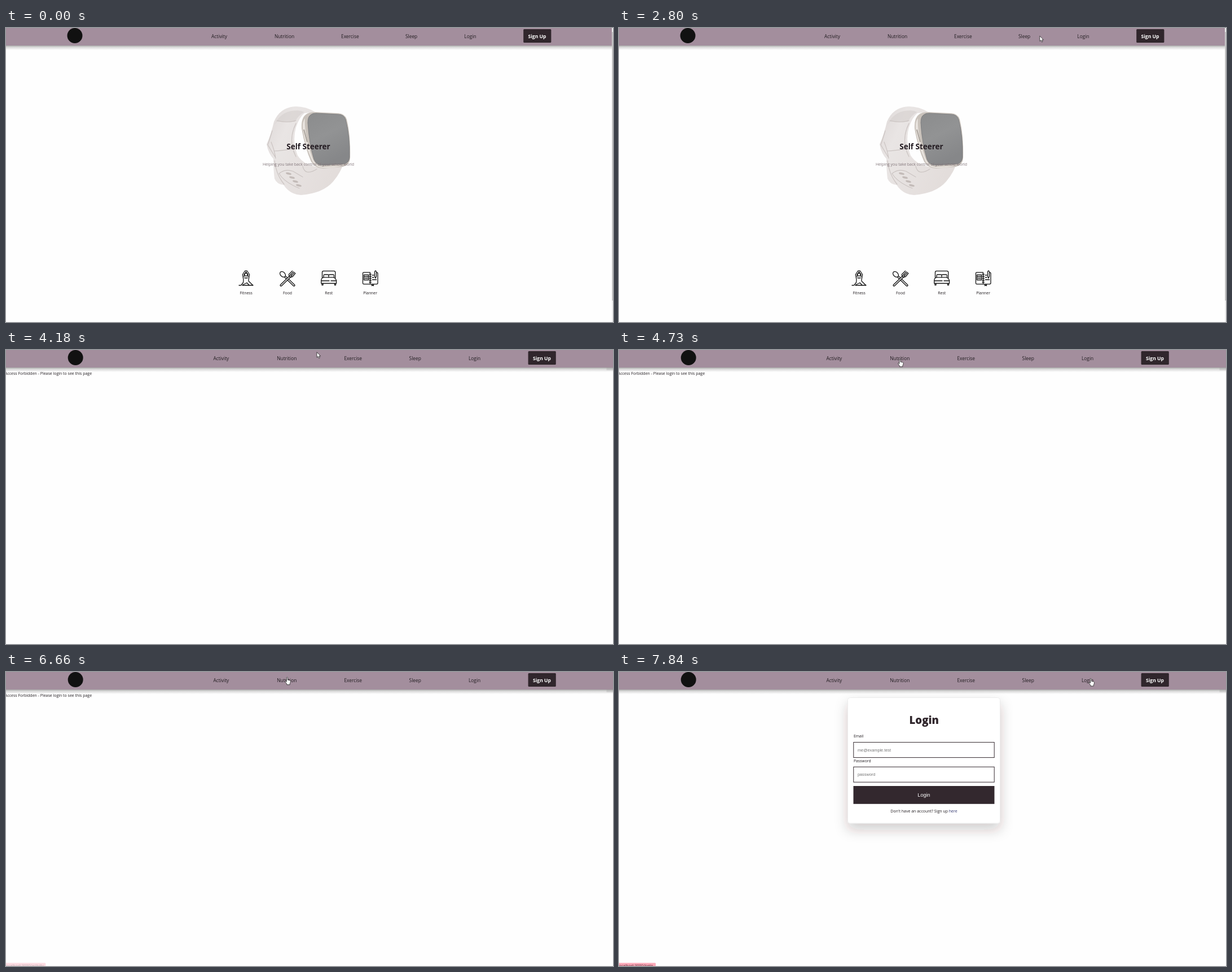
Write an HTML page that moves like this. It is 1076x521 px and loops after 8 s.

```html
<!DOCTYPE html>
<html lang="en">
<head>
<meta charset="utf-8">
<title>Wellness site</title>
<style>
html, body { margin: 0; width: 100%; height: 100%; overflow: hidden; background: #fefefe; }
svg { display: block; }
text { font-family: "Open Sans", "Noto Sans", sans-serif; fill: #221d21; }
.field { font-family: "Liberation Sans", Arial, sans-serif; }
.line { fill: none; stroke: #111; stroke-width: 1.3; stroke-linecap: round; stroke-linejoin: round; }
.seam { fill: none; stroke: #cbc4c2; stroke-width: 1.2; stroke-linecap: round; }
</style>
</head>
<body>
<svg id="stage" width="1076" height="521" viewBox="0 0 1076 521">
  <defs>
    <linearGradient id="drop" x2="0" y2="1">
      <stop offset="0" stop-color="#000" stop-opacity=".42"/>
      <stop offset=".4" stop-color="#000" stop-opacity=".16"/>
      <stop offset="1" stop-color="#000" stop-opacity="0"/>
    </linearGradient>
    <linearGradient id="band" x2="1" y2=".5">
      <stop offset="0" stop-color="#dcd6d5"/>
      <stop offset=".3" stop-color="#e9e5e4"/>
      <stop offset="1" stop-color="#e3dddb"/>
    </linearGradient>
    <linearGradient id="glass" x2=".4" y2="1">
      <stop offset="0" stop-color="#8b8c8d"/>
      <stop offset=".5" stop-color="#929394"/>
      <stop offset="1" stop-color="#868789"/>
    </linearGradient>
    <filter id="lift" x="-20%" y="-20%" width="140%" height="150%">
      <feDropShadow dx="0" dy="11" stdDeviation="11" flood-color="#30262c" flood-opacity=".22"/>
    </filter>
  </defs>
  <rect width="1076" height="521" fill="#fefefe"/>

  <g id="home">
    <g id="watch">
      <path fill="url(#band)" d="M548 149Q532 139 514 139Q486 140 475 166Q470 188 462 206Q465 222 474 232Q474 252 476 267Q480 277 492 278Q503 295 523 296Q562 293 580 272Q592 258 597 243L552 246Q528 243 517 226Q507 201 514 176Q520 158 529 151Z"/>
      <path fill="#d4cecc" d="M516 146Q487 146 476 172L480 166H512Q519 154 529 149Q523 146 516 146Z" opacity=".55"/>
      <path class="seam" d="M480 164Q499 169 514 164M472 182Q466 202 464 207L478 230M470 202Q476 217 478 231M514 169Q499 199 514 228M476 235Q479 260 493 277M484 258Q495 249 509 254L526 264M484 258Q494 274 520 284M526 245Q530 263 551 250M475 218Q490 217 512 214"/>
      <g fill="#c3bbb8">
        <ellipse cx="501" cy="258" rx="5" ry="1.9" transform="rotate(14 501 258)"/>
        <ellipse cx="507" cy="265" rx="5" ry="1.9" transform="rotate(14 507 265)"/>
        <ellipse cx="513" cy="272" rx="5" ry="1.9" transform="rotate(14 513 272)"/>
        <ellipse cx="519" cy="279" rx="5" ry="1.9" transform="rotate(14 519 279)"/>
      </g>
      <path fill="#c9c2bb" d="M532 153Q537 149 548 149L589 151Q601 152 604 162Q611 190 610 231Q609 243 597 246L562 249Q549 249 541 237Q530 213 524 178Q523 159 532 153Z"/>
      <path fill="#e8e3de" d="M530 160Q528 184 542 227Q548 246 562 246L596 244Q584 248 562 248Q550 248 543 236Q529 206 526 178Q525 166 530 160Z"/>
      <path d="M528 180L534 202" stroke="#aaa39c" stroke-width="2" fill="none"/>
      <path fill="url(#glass)" stroke="#77787a" stroke-width=".8" d="M540 154Q543 151 550 151L588 153Q599 153 602 162Q610 192 609 229Q608 240 598 241L562 243Q550 243 546 233Q537 203 535 168Q535 157 540 154Z"/>
    </g>
    <g id="icons" class="line">
      <g>
        <circle cx="425.5" cy="437" r="2.6"/>
        <path d="M421 446L419.3 437L423.5 430.5H427.5L431.7 437L430 446M422 441L422 437L425.5 432.5L429 437V441M423 443H428M421 446L420.5 451L417 455.5M430 446V448.5L437.5 455.8H431L427 451.5L420 455M413 456H416M419 456H438"/>
      </g>
      <g>
        <path d="M494 440L510.5 456" stroke-width="4"/>
        <path d="M494 440L510.5 456" stroke="#fefefe" stroke-width="1.4"/>
        <path d="M505 439L487.5 456" stroke-width="4"/>
        <path d="M505 439L487.5 456" stroke="#fefefe" stroke-width="1.4"/>
        <ellipse cx="490.5" cy="436.5" rx="4" ry="5.7" transform="rotate(-45 490.5 436.5)" fill="#fefefe"/>
        <path d="M507.5 430.5L501.5 436.5Q501 440 504 441.5Q507 442 509 439.5L513 434.5M509.5 432L504.5 437M511.5 433L506.5 438.5"/>
      </g>
      <path d="M560.5 443V433Q560.5 430.7 563 430.7H581Q583.8 430.7 583.8 433V443M563 442V438.5Q563 437 565 437H570Q572 437 572 438.5V442M572 442V438.5Q572 437 574 437H579.5Q581.5 437 581.5 438.5V442M560.5 443Q562 441.8 564 441.8H580Q583 441.8 585.6 447V452.5H558.8V447Q559 444.5 560.5 443M559 448H573M576 448H585.5M560 452.5V455.5H562V453M582.5 453V455.5H584.5V452.5"/>
      <path d="M645.5 433.2H634Q632.5 433.2 632.5 435V452Q632.5 453.8 634 453.8H657Q659 453.8 659 452V435Q659 433.2 657 433.2M634.5 437.5H642.5V446.5H634.5ZM634.5 440.5H642.5M636 443.5H641M645.5 434V453M644 436.5H647.5M644 440H647.5M644 443.5H647.5M644 447H647.5M644 450.5H647.5M649.5 438H652M649.5 442H652M649.5 446H656.5M653.5 432Q655 428.5 656.5 432V440L655 443.5L653.5 440ZM648.5 454V456.8L650 455.5L651.5 456.8V454"/>
    </g>
  </g>

  <g id="denied"></g>

  <g id="login">
    <rect x="405.5" y="45.5" width="270" height="222.5" rx="4" fill="#fff" stroke="#ececec" filter="url(#lift)"/>
    <g fill="#fff" stroke="#33282e">
      <rect x="415.8" y="124.6" width="249.4" height="27"/>
      <rect x="415.8" y="168.2" width="249.4" height="27"/>
    </g>
    <rect x="415.5" y="202" width="250" height="31.8" fill="#33282e"/>
  </g>

  <g id="nav">
    <rect id="shade" y="30" height="9" fill="url(#drop)"/>
    <rect id="bar" height="31" fill="#a38e9d"/>
    <circle id="mark" cy="13.5" r="13.5" fill="#111"/>
    <rect id="button" y="2" width="49.2" height="24" rx="1.5" fill="#30262c"/>
  </g>
  <g id="scroll">
    <rect x="1074" width="2" height="521" fill="#eeeeee"/>
    <rect x="1074.4" y="7" width="1.6" height="476" fill="#bdbdbd"/>
  </g>
  <rect id="corner" x="1064.5" y="31" width="11.5" height="5" fill="#888" opacity=".2"/>

  <g id="status">
    <path id="tab" fill="#fba9b8"/>
  </g>
  <circle id="press" r="8.3" fill="#e0cb10" opacity=".82"/>
  <path id="arrow" d="M0 0V9.4L2.1 7.5L3.6 10.8L5.2 10.1L3.8 7H6.6Z" fill="#fff" stroke="#222" stroke-width=".8"/>
  <path id="hand" d="M-1 1Q0 -.4 1 1V5L4.8 5.8Q6 6.2 6 7.4Q6 10 4.8 11.5V13.6H-.6V12.2L-3.3 8.4Q-3.6 7 -2.4 7.1L-1 8.4Z" fill="#fff" stroke="#222" stroke-width=".8"/>
</svg>
<script>
const LOOP = 8000;
const $ = id => document.getElementById(id);

function addText(parent, str, x, y, size, opts = {}) {
  const el = document.createElementNS("http://www.w3.org/2000/svg", "text");
  el.textContent = str;
  Object.entries({ x, y, ...opts }).forEach(([k, v]) => el.setAttribute(k, v));
  el.style.fontSize = size + "px";
  if (opts.color) el.style.fill = opts.color;
  $(parent).append(el);
  return el;
}
const mid = { "text-anchor": "middle" };

addText("home", "Self Steerer", 536, 215, 13.5, { ...mid, "font-weight": 700, color: "#221a20" });
addText("home", "Helping you take back control of your whole world", 536, 243.6, 6.94, { ...mid, color: "#82767a" });
["Fitness", "Food", "Rest", "Planner"].forEach((s, i) => addText("home", s, 425.7 + 73.3 * i, 471.6, 6.9, mid));

addText("denied", "Access Forbidden - Please login to see this page", -2, 43.6, 6.97);

addText("login", "Login", 540.7, 92, 18.6, { ...mid, "font-weight": 800, color: "#30262c" });
addText("login", "Email", 416, 116, 6.8);
addText("login", "Password", 416, 159.6, 6.8);
addText("login", "me@example.test", 423, 140.8, 7.3, { class: "field", color: "#757575" });
addText("login", "password", 423, 184.4, 7.3, { class: "field", color: "#757575" });
addText("login", "Login", 540.5, 221, 9.1, { ...mid, class: "field", color: "#fff" });
const signUp = addText("login", "Don't have an account? Sign up ", 540.5, 248.9, 7, mid);
signUp.innerHTML += '<tspan style="fill:#30356e">here</tspan>';

// name, centre with the scrollbar, centre without it, half width
const links = [
  ["Activity", 378, 381.4, 15], ["Nutrition", 493.5, 497.8, 18], ["Exercise", 609.8, 615.2, 16],
  ["Sleep", 718.6, 725.2, 11], ["Login", 823, 830.6, 12]
];
const linkEls = links.map(([s]) => addText("nav", s, 0, 17.6, 8.4, { ...mid, "font-weight": 500 }));
const joinEl = addText("nav", "Sign Up", 0, 17.6, 8.6, { ...mid, "font-weight": 700, color: "#fff" });
const url = addText("status", "", -1.5, 523.4, 6.6, { color: "#5b2f3a" });

// pointer path: time, x, y
const path = [
  [190, 962, 350], [240, 948, 200], [290, 939, 106], [599, 939, 106], [600, 945, 47],
  [999, 945, 47], [1000, 866, 1], [1150, 820, 52], [1300, 760, 124], [1520, 706, 174],
  [1700, 706, 174], [1720, 680, 178], [1890, 549, 192], [2050, 549, 192],
  [2200, 500, 150], [2350, 482, 60], [2450, 500, 13], [2700, 795, 12], [2850, 722, 15],
  [3080, 722, 15], [3380, 617, 17.5], [3770, 617, 17.5], [4150, 555, 3], [4580, 500, 14],
  [4630, 498, 16], [5310, 498, 16], [5550, 440, 3], [5800, 387.5, 14.3], [6229, 387.5, 14.3],
  [6230, 388, 14.3], [6510, 388, 14.3], [6800, 600, 4], [7050, 865, 7], [7280, 836.5, 11.3]
];
const clicks = [[2950, 3050], [3470, 3570], [4780, 4890], [5820, 5970], [7670, 7790]];
// link, fade-in start, fade-out start
const hints = [["sleep", 2860, 3200], ["exercise", 3430, 3850], ["nutrition", 4780, 5400],
  ["activity", 5720, 6600], ["login", 7240, 9000]];

function pointer(t) {
  const i = path.findIndex(k => k[0] > t);
  if (i < 0) return path[path.length - 1].slice(1);
  if (i === 0) return path[0].slice(1);
  const [t0, x0, y0] = path[i - 1], [t1, x1, y1] = path[i];
  const u = (t - t0) / (t1 - t0);
  return [x0 + (x1 - x0) * u, y0 + (y1 - y0) * u];
}

const show = (id, on) => { $(id).style.display = on ? "" : "none"; };
const clamp = v => Math.max(0, Math.min(1, v));

function layout(wide) {
  const w = wide ? 1076 : 1074;
  $("bar").setAttribute("width", w);
  $("shade").setAttribute("width", w);
  $("mark").setAttribute("cx", wide ? 123.2 : 122);
  $("button").setAttribute("x", wide ? 925.6 : 917.2);
  joinEl.setAttribute("x", wide ? 950 : 941.5);
  linkEls.forEach((el, i) => el.setAttribute("x", links[i][wide ? 2 : 1]));
  show("scroll", !wide);
  show("corner", wide);
}

function drawHint(t) {
  const hint = hints.find(h => t >= h[1] && t < h[2] + 100);
  show("status", hint);
  if (!hint) return;
  const [name, from, to] = hint;
  url.textContent = "localhost:3000/" + name;
  const w = 48.6 + name.length * 2.9 - (name === "login" ? -2 : 1.5);
  $("tab").setAttribute("d", `M0 515.5H${w - 1}Q${w} 515.5 ${w} 517V521H0Z`);
  $("status").style.opacity = Math.min(clamp((t - from) / 90), clamp((to + 100 - t) / 100));
}

function draw(t) {
  const wide = t >= 3050;
  layout(wide);
  show("home", !wide);
  show("denied", wide && t < 7790);
  show("login", t >= 7790);
  drawHint(t);

  const [x, y] = pointer(t);
  const seen = (t >= 190 && t < 650) || t >= 1000;
  const over = y > 6 && y < 24 && links.some(l => Math.abs(x - l[wide ? 2 : 1]) < l[3]);
  show("arrow", seen && !over);
  show("hand", seen && over);
  show("press", clicks.some(([a, b]) => t >= a && t < b));
  ["arrow", "hand", "press"].forEach(id => $(id).setAttribute("transform", `translate(${x} ${y})`));
}

const start = performance.now();
function tick() {
  draw((performance.now() - start) % LOOP);
  requestAnimationFrame(tick);
}
tick();
</script>
</body>
</html>
```
